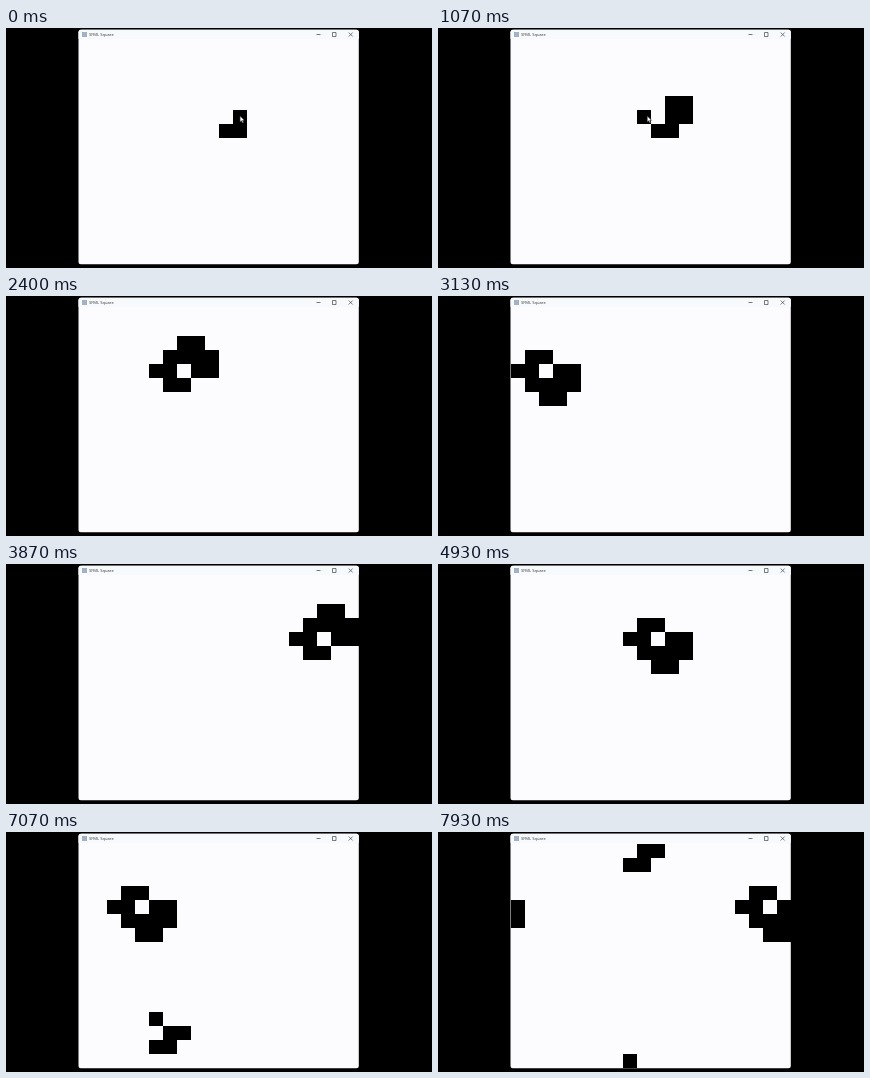
Write an HTML page with a canvas that moves like this. It is 426 px wide and 240 px high and loops after 8 s.

```html
<!DOCTYPE html>
<html lang="en">
<head>
<meta charset="utf-8">
<title>Cell grid</title>
<style>
  html, body { margin: 0; width: 100%; height: 100%; overflow: hidden; background: #000; }
  canvas { display: block; width: 426px; height: 240px; }
</style>
</head>
<body>
<canvas id="stage" width="426" height="240"></canvas>
<script>
const ctx = document.getElementById('stage').getContext('2d');
const LOOP = 8000, COLS = 20, ROWS = 16, CELL = 14, LEFT = 73, TOP = 12, STEP = 74;

// Letters give the order in which cells are clicked; pace is the delay scale in ms,
// lag the time from a click until the pointer rests on that cell's centre.
const ship = {
  row: 3, col: 8, start: -940, pace: 470, lag: 140, runAt: 1930, generations: 44,
  pattern: ['.kl..',
            'ji.fe',
            '.ghcd',
            '..ab.']
};
const glider = {
  row: 10, col: 3, start: 5480, pace: 270, lag: -30, runAt: 6413, generations: 21,
  pattern: ['e..',
            '.cd',
            'ab.']
};
const phases = [ship, glider];

const mod = (n, size) => (n + size) % size;
const smooth = p => p * p * (3 - 2 * p);

// Clicks come a little faster as the drawing goes on.
function clicksOf({ pattern, row, col, start, pace }) {
  return pattern
    .flatMap((line, r) => [...line].map((letter, c) => ({ letter, row: row + r, col: col + c })))
    .filter(cell => cell.letter !== '.')
    .sort((a, b) => a.letter.localeCompare(b.letter))
    .map((cell, order) => ({ ...cell, at: start + pace * order ** 0.75 }));
}

function nextGeneration(cells) {
  const counts = new Map();
  for (const id of cells) {
    const row = Math.floor(id / COLS), col = id % COLS;
    for (let dr = -1; dr <= 1; dr++) {
      for (let dc = -1; dc <= 1; dc++) {
        if (!dr && !dc) continue;
        const near = mod(row + dr, ROWS) * COLS + mod(col + dc, COLS);
        counts.set(near, (counts.get(near) || 0) + 1);
      }
    }
  }
  return new Set([...counts]
    .filter(([id, n]) => n === 3 || (n === 2 && cells.has(id)))
    .map(([id]) => id));
}

function buildTimeline() {
  const timeline = [];
  let cells = new Set();
  for (const phase of phases) {
    phase.clicks = clicksOf(phase);
    for (const { at, row, col } of phase.clicks) {
      cells = new Set(cells).add(row * COLS + col);
      timeline.push({ at, cells });
    }
    for (let i = 1; i <= phase.generations; i++) {
      cells = nextGeneration(cells);
      timeline.push({ at: phase.runAt + i * STEP, cells });
    }
  }
  return timeline;
}

const timeline = buildTimeline();

function pointerAt(time) {
  const phase = phases.find(({ start, runAt }) => time >= start - 250 && time < runAt);
  if (!phase) return null;
  const stops = phase.clicks.map(({ at, row, col }) => ({
    at: at + phase.lag,
    x: LEFT + (col + 0.5) * CELL,
    y: TOP + (row + 0.5) * CELL - 1
  }));
  const next = stops.findIndex(stop => stop.at > time);
  if (next < 1) return stops.at(next);
  const a = stops[next - 1], b = stops[next];
  const p = smooth((time - a.at) / (b.at - a.at));
  return { x: a.x + (b.x - a.x) * p, y: a.y + (b.y - a.y) * p };
}

function drawWindow() {
  ctx.fillStyle = '#000';
  ctx.fillRect(0, 0, 426, 240);

  ctx.save();
  ctx.beginPath();
  ctx.roundRect(72.5, 1.8, 280.3, 234.5, 2.5);
  ctx.fillStyle = '#fcfcfe';
  ctx.fill();
  ctx.clip();
  ctx.fillStyle = '#f7fafd';
  ctx.fillRect(72, 0, 282, TOP - 1);
  ctx.restore();

  ctx.fillStyle = '#a3b1c0';
  ctx.fillRect(76, 4, 5, 5);
  ctx.fillStyle = '#333';
  ctx.font = '4.1px "Open Sans", sans-serif';
  ctx.fillText('SFML Square', 83, 8.2);

  ctx.strokeStyle = '#444';
  ctx.lineWidth = 0.7;
  ctx.beginPath();
  ctx.moveTo(310.5, 6.5);
  ctx.lineTo(314.5, 6.5);
  ctx.rect(326.5, 4.5, 3.5, 4);
  ctx.moveTo(342.7, 4.5);
  ctx.lineTo(346.7, 8.5);
  ctx.moveTo(346.7, 4.5);
  ctx.lineTo(342.7, 8.5);
  ctx.stroke();
}

function drawPointer({ x, y }) {
  ctx.save();
  ctx.translate(x, y);
  ctx.fillStyle = '#fff';
  ctx.strokeStyle = '#333';
  ctx.lineWidth = 0.6;
  const arrow = new Path2D('M0 0V6L1.4 4.8L2.4 7L3.4 6.5L2.5 4.4L4.3 4.3Z');
  ctx.fill(arrow);
  ctx.stroke(arrow);
  ctx.restore();
}

function draw(time) {
  drawWindow();
  ctx.fillStyle = '#000';
  for (const id of timeline.findLast(entry => entry.at <= time).cells) {
    ctx.fillRect(LEFT + id % COLS * CELL, TOP + Math.floor(id / COLS) * CELL, CELL, CELL);
  }
  const pointer = pointerAt(time);
  if (pointer) drawPointer(pointer);
}

const start = performance.now();
function tick() {
  draw((performance.now() - start) % LOOP);
  requestAnimationFrame(tick);
}
tick();
</script>
</body>
</html>
```
